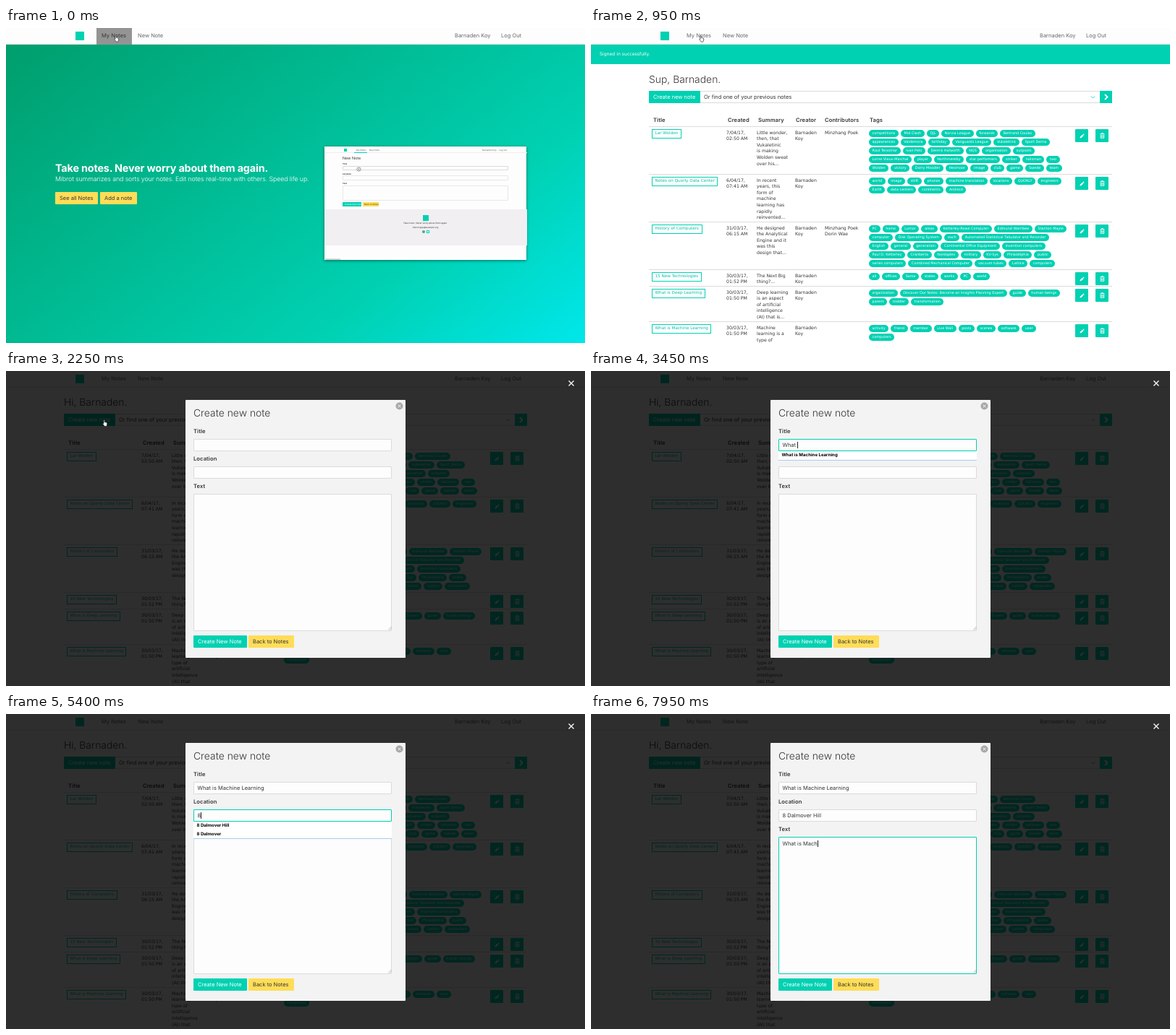
Write an HTML page that moves like this. It is 800 px wide and 436 px high and loops after 8000 ms.

```html
<!DOCTYPE html>
<html lang="en">
<head>
<meta charset="utf-8">
<title>Notes app</title>
<style>
:root { --teal: #00d1b2; --ink: #363636; --yellow: #ffdd57; }
html, body { margin: 0; width: 100%; height: 100%; overflow: hidden; background: #fff; }
body { font: 7.5px Inter, sans-serif; color: var(--ink); text-rendering: geometricPrecision; }
div, p, svg { position: absolute; }
div { box-sizing: border-box; }
p { margin: 0; line-height: 0; white-space: nowrap; }
#stage { left: 0; top: 0; width: 800px; height: 436px; overflow: hidden; }
.layer { left: 0; top: 0; width: 800px; height: 436px; }

.teal { background: var(--teal); }
.yellow { background: var(--yellow); }
.white { color: #fff; }
.nav { color: #696969; }
.h1 { font-size: 13.9px; font-weight: 300; }
.strong { font-size: 7.6px; font-weight: 600; letter-spacing: .08px; }
.cell { font: 6.2px/0 "DejaVu Sans", sans-serif; }
.line { background: #dbdbdb; height: 1px; }
.tag { border: 1px solid var(--teal); color: #00c4a7; font: 5.7px/11px "DejaVu Sans", sans-serif; padding: 0 3.5px; height: 13px; white-space: nowrap; }
.pills { display: flex; gap: 3px; }
.pills b { font: 4.9px/10px "DejaVu Sans", sans-serif; height: 10px; padding: 0 4.6px; border-radius: 5px; background: var(--teal); color: #fff; white-space: nowrap; }
.field { border: 1px solid #dbdbdb; background: #fdfdfd; border-radius: 1px; }
.field.on { border-color: var(--teal); }
.drop { background: #fff; border-bottom: 1px solid #a9cdea; left: 259px; width: 274px; }
.drop p { left: 4.5px; font-size: 6.1px; font-weight: 700; color: #000; }
.caret { border-right: .8px solid transparent; }
.caret.on { border-color: #222; }

#hero { top: 23px; height: 413px; background: linear-gradient(141deg, #009e6c 0%, #00d1b2 71%, #00e7eb 100%); }
.mini p { font-size: 3px; }
.mini .lead { font-size: 5.4px; }
.mini .bold { font-weight: 700; font-size: 2.8px; }

#home { animation: home 8s step-end infinite; }
#flash, #sup { animation: flash 8s step-end infinite; }
#hi { animation: hi 8s step-end infinite; }
#list { animation: list 8s step-end infinite; }
#head { animation: head 8s step-end infinite; }
#create { animation: create 8s step-end infinite; }
#dim { background: rgba(0, 0, 0, .82); animation: dim 8s linear infinite; }
#hand { animation: hand 8s ease-in-out infinite, handoff 8s step-end infinite; }
#beam { left: 298px; top: 97px; animation: beam 8s step-end infinite; }
@keyframes home { 0% { visibility: visible } 11.875%, 100% { visibility: hidden } }
@keyframes flash { 0% { visibility: visible } 15%, 100% { visibility: hidden } }
@keyframes hi { 0% { visibility: hidden } 15%, 100% { visibility: visible } }
@keyframes list { 0% { transform: translateY(28px) } 15%, 100% { transform: none } }
@keyframes head { 0% { background: #fff } 17.5% { background: #f3f3f3 } 23.2%, 100% { background: #fff } }
@keyframes create { 0% { background: #00d1b2 } 20.3%, 100% { background: #00c4a7 } }
@keyframes dim { 0%, 23.6% { opacity: 0 } 26.6%, 100% { opacity: 1 } }
@keyframes hand {
  0%, 11% { transform: translate(149px, 9.5px) }
  15% { transform: translate(148.5px, 10.5px) }
  18% { transform: translate(140px, 92px) }
  20.8%, 23% { transform: translate(133px, 74px) }
  25%, 28.4% { transform: translate(133px, 67px) }
  32.5%, 100% { transform: translate(296px, 97px) }
}
@keyframes handoff { 0% { visibility: visible } 32.5%, 100% { visibility: hidden } }
@keyframes beam { 0% { visibility: hidden } 32.5% { visibility: visible } 39.375%, 100% { visibility: hidden } }
</style>
</head>
<body>
<div id="stage"></div>
<script>
const text = (x, y, s, cls = '', id = '') =>
  `<p id="${id}" class="${cls}" style="left:${x}px;top:${y}px">${s}</p>`;
const box = (x, y, w, h, cls = '', style = '', inner = '', id = '') =>
  `<div id="${id}" class="${cls}" style="left:${x}px;top:${y}px;width:${w}px;height:${h}px;${style}">${inner}</div>`;
const icon = (x, y, w, h, inner) =>
  `<svg style="left:${x}px;top:${y}px" width="${w}" height="${h}" viewBox="0 0 ${w} ${h}" fill="none">${inner}</svg>`;
const lines = (x, y, s) => s.split('|').map((l, i) => text(x, y + i * 8.6, l, 'cell')).join('');

const owner = 'Barnaden';
const rows = [
  { y: 109, title: 'Lar Wolden', date: '7/04/17,|02:50 AM', with: 'Minzhang Poek',
    sum: 'Little wonder,|then, that|Vukaletinic|is making|Wolden sweat|over his...',
    tags: 'competitions,Mid Clash,OJL,Norvia League,forwards,Bertrand Coulas|appearances,Valdemora,birthday,Vanguards League,Vukaletinic,Sport Derna|Raul Teixomar,Ivan Pelo,Dennis Halworth,NQS,organisation,outposts|Lorne Vieux-Marchal,player,Northmereby,star performers,striker,talisman,two|Wolden,victory,Darry Mooden,Hexmoor,image,club,game,Swede,team' },
  { y: 175, title: 'Notes on Quorly Data Center', date: '6/04/17,|07:41 AM', with: '',
    sum: 'In recent|years, this|form of|machine|learning has|rapidly|reinvented...',
    tags: 'world,image,shift,phones,machine translation,locations,QUORLY,engineers|Earth,data centers,continents,Android' },
  { y: 241, title: 'History of Computers', date: '31/03/17,|06:15 AM', with: 'Minzhang Poek|Dorin Wae',
    sum: 'He designed|the Analytical|Engine and it|was this|design that...',
    tags: 'PC,home,Lumor,areas,Ketterley-Rowe Computer,Edmund Warribee,Stanton Mayle|computer,Disk Operating System,each,Automated Statistical Tabulator and Recorder|English,general,generation,Continental Office Equipment,invention computers|Paul D. Ketterley,Cranberta,Nordaplex,military,KV-Sys,Philadelphia,public|series computers,Combined Mechanical Computer,vacuum tubes,Lattice,computers' },
  { y: 307, title: '15 New Technologies', date: '30/03/17,|01:52 PM', with: '',
    sum: 'The Next Big|thing?...', tags: 'all,offices,Some,states,works,PC,world' },
  { y: 330, title: 'What is Deep Learning', date: '30/03/17,|01:50 PM', with: '',
    sum: 'Deep learning|is an aspect|of artificial|intelligence|(AI) that is...',
    tags: 'organization,Discover Our Notes: Become an Insights Planning Expert,guide,human beings|parent,toddler,transformation' },
  { y: 379, title: 'What is Machine Learning', date: '30/03/17,|01:50 PM', with: '',
    sum: 'Machine|learning is a|type of|artificial|intelligence|(AI) that',
    tags: 'activity,friend,member,Live Wall,posts,scenes,software,user|computers' }
];

const pencil = icon(6, 6, 7, 7, '<path d="M.4 6.6l.5-2 3.2-3.2 1.5 1.5-3.2 3.2zM4.6 1l.7-.7 1.4 1.4-.7.7z" fill="#fff"/>');
const bin = icon(6, 5, 7, 8, '<path d="M.5 1.7h6M2.5 1.5V.6h2v.9M1.2 2.5v4.8h4.6V2.5M2.8 3.2v3M4.2 3.2v3" stroke="#fff" stroke-width=".9"/>');

const row = r => [
  box(80, r.y - 1, 640, 1, 'line'),
  `<div class="tag" style="left:84px;top:${r.y + 3}px">${r.title}</div>`,
  lines(187, r.y + 8.5, r.date),
  lines(229, r.y + 8.5, r.sum),
  lines(282, r.y + 8.5, owner + '|Koy'),
  lines(323, r.y + 8.5, r.with),
  ...r.tags.split('|').map((l, i) =>
    `<div class="pills" style="left:384px;top:${r.y + 4 + i * 12}px">${l.split(',').map(s => `<b>${s}</b>`).join('')}</div>`),
  box(669, r.y + 3, 18, 18, 'teal', 'border-radius:1px', pencil),
  box(697, r.y + 3, 18, 18, 'teal', 'border-radius:1px', bin)
].join('');

const heads = { Title: 86, Created: 189, Summary: 231, Creator: 283, Contributors: 323, Tags: 385 };
const list = [
  text(80, 43.5, `Sup, ${owner}.`, 'h1', 'sup'),
  text(80, 43.5, `Hi, ${owner}.`, 'h1', 'hi'),
  box(80, 59, 640, 17, 'field', 'background:#fff'),
  box(80, 59, 71, 17, '', '', text(6, 8.5, 'Create new note', 'white'), 'create'),
  text(156, 68, 'Or find one of your previous notes'),
  icon(690, 65, 7, 6, '<path d="M1 1.5l2.5 2.5L6 1.5" stroke="#00d1b2" stroke-width=".9"/>'),
  box(703, 59, 17, 17, 'teal', '', icon(5, 4, 8, 9, '<path d="M2 1l3.5 3.5L2 8" stroke="#fff" stroke-width="1.8"/>')),
  box(80, 90, 640, 19, '', '', '', 'head'),
  ...Object.entries(heads).map(([s, x]) => text(x, 99.5, s, 'strong')),
  ...rows.map(row)
].join('');

const nav = hover => [
  box(0, 0, 800, 23, '', 'background:#fdfdfd;border-bottom:1px solid #e3e3e3'),
  hover ? box(125, 0, 49, 23, '', 'background:#949494') : '',
  box(96, 5, 12, 12, 'teal'),
  text(132, 11, 'My Notes', hover ? '' : 'nav'),
  text(182, 11, 'New Note', 'nav'),
  text(620, 11, owner + ' Koy', 'nav'),
  text(684, 11, 'Log Out', 'nav')
].join('');

const slogan = 'Take notes. Never worry about them again.';
const mini = [
  box(27, 3, 4, 4, 'teal'),
  text(44, 4.5, 'My Notes', 'nav'), text(62, 4.5, 'New Note', 'nav'),
  text(218, 4.5, owner + ' Koy', 'nav'), text(241, 4.5, 'Log Out', 'nav'),
  box(0, 8, 280, 1, 'line', 'background:#eee'), box(41, 8, 18, 1, 'teal'),
  text(25, 16.5, 'New Note', 'lead'),
  text(25, 23.5, 'Title', 'bold'), box(25, 27, 229, 6, 'field'),
  text(25, 37.5, 'Location', 'bold'), box(25, 40, 229, 7, 'field', 'border-color:#e8e8e8'),
  text(25, 51, 'Text', 'bold'), box(25, 54, 229, 21, 'field', 'border-color:#e8e8e8'),
  box(25, 77, 26, 6, 'teal', '', text(3, 3, 'Create New Note', 'white')),
  box(53, 77, 22, 6, 'yellow', '', text(2, 3, 'Back to Notes')),
  box(0, 87, 280, 50, '', 'background:#f1eff1'),
  box(136, 95, 8, 8, 'teal'),
  text(139.5, 106, slogan, 'mid'), text(139.5, 112, 'mibrot.app@example.org', 'mid'),
  box(135, 116, 4, 4, '', 'border-radius:2px;background:#4aa69a'),
  box(141, 116, 4, 4, '', 'border:1px solid #00d1b2'),
  icon(44, 28, 7, 7, '<circle cx="3.5" cy="3.5" r="2.6" stroke="#666" stroke-width=".7"/><path d="M3.5 2v3" stroke="#666" stroke-width=".6"/>'),
  box(1, 155, 21, 2, '', 'background:#d5d5d5')
].join('').replace(/class="mid" style="/g, 'style="transform:translateX(-50%);');

const home = [
  '<div id="hero" class="layer"></div>', nav(true),
  text(68, 195, slogan, 'white', 'slogan'),
  text(68, 210, 'Mibrot summarizes and sorts your notes. Edit notes real-time with others. Speed life up.', 'white', 'pitch'),
  box(68, 227, 59, 17, 'yellow', 'border-radius:1px', text(6, 9, 'See all Notes')),
  box(130, 227, 51, 17, 'yellow', 'border-radius:1px', text(6, 9, 'Add a note')),
  box(440, 164, 279, 157, 'mini', 'background:#fdfdfd;box-shadow:0 1px 4px rgba(0,0,0,.5)', mini)
].join('');

const form = [
  box(248, 40, 304, 357, '', 'background:#f3f3f3;border-radius:1px'),
  icon(538, 43, 11, 11, '<circle cx="5.5" cy="5.5" r="5" fill="#a8a8a8"/><path d="M3.7 3.7l3.6 3.6M7.3 3.7L3.7 7.3" stroke="#fff"/>'),
  icon(776, 12, 10, 10, '<path d="M1.5 1.5l7 7M8.5 1.5l-7 7" stroke="#fff" stroke-width="1.3"/>'),
  text(259, 59, 'Create new note', 'h1'),
  text(259, 84, 'Title', 'strong'), text(259, 122, 'Location', 'strong'), text(259, 160, 'Text', 'strong'),
  ...[[94, 17], [132, 17], [170, 190]].map(([y, h], i) =>
    box(259, y, 274, h, 'field', '', text(4.5, i < 2 ? 7.5 : 9, '<span class="caret"></span>'), 'field' + i)),
  icon(528, 354, 5, 5, '<path d="M0 4.5L4.5 0M2.5 4.5l2-2" stroke="#888" stroke-width=".6"/>'),
  box(259, 366, 74, 17, 'teal', 'border-radius:1px', text(6, 9, 'Create New Note', 'white')),
  box(335, 366, 63, 17, 'yellow', 'border-radius:1px', text(6, 9, 'Back to Notes')),
  '<div id="drop" class="drop"></div>'
].join('');

const stage = document.getElementById('stage');
stage.innerHTML = [
  nav(false),
  box(0, 23, 800, 27, 'teal', '', text(12, 14, 'Signed in successfully.', 'cell white'), 'flash'),
  `<div id="list" class="layer">${list}</div>`,
  `<div id="home" class="layer">${home}</div>`,
  `<div id="dim" class="layer">${form}</div>`,
  '<svg id="hand" width="8" height="10" viewBox="0 0 8 10"><path d="M2 5.6V1.2q.7-.9 1.3 0v2.6q.7-.5 1.2.2.7-.4 1.1.3.9-.2 1.1.7v2q-.2 1.2-.8 2.4H3Q2 7.7.6 6q.3-1 1.4-.4z" fill="#fff" stroke="#222" stroke-width=".7"/></svg>',
  '<svg id="beam" width="5" height="10" viewBox="0 0 5 10"><path d="M1 .5q1.5 0 1.5 1v7q0 1-1.5 1M4 .5q-1.5 0-1.5 1v7q0 1 1.5 1" fill="none" stroke="#333" stroke-width=".7"/></svg>'
].join('');
document.getElementById('slogan').style.cssText += 'font-size:14.4px;font-weight:700;letter-spacing:-.18px';
document.getElementById('pitch').style.cssText += 'font-size:8.85px;font-weight:300;letter-spacing:-.1px';

// keys: [ms, letters typed]; idle: spans with the caret blinked off
const fields = [
  { from: 2650, to: 5000, value: 'What is Machine Learning', keys: [[3150, 1], [4622, 24]],
    hints: ['What is Machine Learning'], idle: [[2900, 3150], [4850, 5000]] },
  { from: 5000, to: 7150, value: '8 Dalmover Hill', keys: [[5250, 1], [5650, 3], [6290, 7], [6370, 8], [6950, 15]],
    hints: ['8 Dalmover Hill', '8 Dalmover'], idle: [] },
  { from: 7150, to: 8001, value: 'What is Mach', keys: [[7460, 1], [7940, 12]], hints: [], idle: [] }
];

function typed(keys, t) {
  if (t < keys[0][0]) return 0;
  for (let i = 1; i < keys.length; i++) {
    const [a, m] = keys[i - 1], [b, n] = keys[i];
    if (t < b) return Math.floor(m + (n - m) * (t - a) / (b - a));
  }
  return keys[keys.length - 1][1];
}

const drop = document.getElementById('drop');
let start;
function draw(now) {
  start ??= now;
  const t = (now - start) % 8000;
  let hints = [], top = 0;
  fields.forEach((f, i) => {
    const el = document.getElementById('field' + i), span = el.querySelector('span');
    const s = f.value.slice(0, typed(f.keys, t));
    const on = t >= f.from && t < f.to;
    el.classList.toggle('on', on);
    span.textContent = s || '\u200b';
    span.style.whiteSpace = 'pre';
    span.classList.toggle('on', on && !f.idle.some(([a, b]) => t >= a && t < b));
    if (on && s) {
      hints = f.hints.filter(h => h.startsWith(s) && h !== s);
      top = i ? 149 : 111;
    }
  });
  drop.style.display = hints.length ? 'block' : 'none';
  drop.style.top = top + 'px';
  drop.style.height = hints.length * 11.5 + 1 + 'px';
  drop.innerHTML = hints.map((h, i) => `<p style="top:${6 + i * 11.5}px">${h}</p>`).join('');
  requestAnimationFrame(draw);
}
requestAnimationFrame(draw);
</script>
</body>
</html>
```
